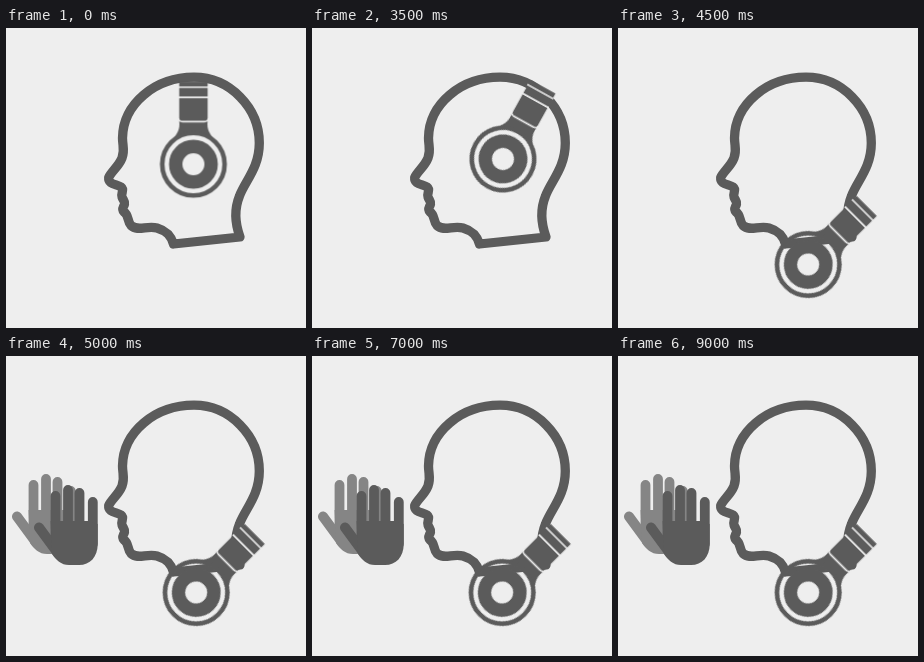
Write an HTML page without scripts that moves like this. It is 300x300 px and loops after 9500 ms.

```html
<!DOCTYPE html>
<html lang="en">
<head>
<meta charset="utf-8">
<title>Headphones off, hands clap</title>
<style>
  :root { --bg: #eee; --ink: #5b5b5b; --soft: #858585; }
  html, body { margin: 0; width: 100%; height: 100%; overflow: hidden; background: var(--bg); }
  svg { display: block; width: 100vw; height: 100vh; }

  .line { fill: none; stroke: var(--ink); stroke-linejoin: round; stroke-linecap: round; }
  .gap { fill: none; stroke: var(--bg); stroke-width: 1.7; }
  .wave { stroke-width: 1.7; }
  .ink { fill: var(--ink); }

  .phones, .wave, .hands, .hand { animation: 9.5s step-end infinite; }
  .phones { animation-name: slide; }
  .w1 { animation-name: w1; }
  .w2 { animation-name: w2; }
  .w3 { animation-name: w3; }
  .hands { animation-name: show; }
  .hand { animation-name: clap; }
  .back { --part: -9px; fill: var(--soft); stroke: var(--soft); }
  .front { --part: 7px; fill: var(--ink); stroke: var(--ink); }

  /* one step is 500 ms = 5.263% */
  @keyframes slide {
    0% { transform: translate(187.4px, 136.2px); }
    36.842% { transform: translate(191px, 131px) rotate(29deg); }
    42.105% { transform: translate(190px, 163.5px) rotate(62.5deg); }
    47.368%, 100% { transform: translate(190.2px, 236.5px) rotate(45deg); }
  }
  @keyframes w1 {
    0%, 36.842%, 100% { opacity: 0; }
    5.263% { opacity: 1; }
  }
  @keyframes w2 {
    0%, 21.052%, 36.842%, 100% { opacity: 0; }
    10.526%, 26.315% { opacity: 1; }
  }
  @keyframes w3 {
    0%, 21.052%, 36.842%, 100% { opacity: 0; }
    15.789%, 31.578% { opacity: 1; }
  }
  @keyframes show {
    0% { opacity: 0; }
    52.631%, 100% { opacity: 1; }
  }
  @keyframes clap {
    0%, 63.157%, 73.684%, 84.21%, 94.736%, 100% { transform: none; }
    57.894%, 68.421%, 78.947%, 89.473% { transform: translateY(var(--part)); }
  }
</style>
</head>
<body>
<svg viewBox="0 0 300 300">
  <defs>
    <g id="hand" stroke-linecap="round">
      <path fill="none" stroke-width="9.8" d="M49.5 140V180M62 134V180M73.5 137V180M86.8 146V188"/>
      <path fill="none" stroke-width="10" d="M33 171.5L51 196"/>
      <path stroke="none" d="M44.6 165H82L91.7 168V188C91.7 201 84 209 73 209H63C55 209 50 204 46 198Z"/>
    </g>
  </defs>

  <path class="line" stroke-width="9.3" d="M188 49.200
    C149 49.200 117 76 116.500 110
    C116.500 118 119 122 116 130
    C113 138 105 144 102.700 149.500
    C102 157 111 156 115 159
    C119 162 114.500 165 116 169
    C117 172 119 173 118.500 176
    C118 179 115 181 118 184
    C123 187 121 193 125 197.500
    C132 204 141 197 151 200
    C161 203 165 208 167.500 216
    L234 209
    C230 198 227 184 233.500 168
    C239 153 253.300 140 253.300 115
    C253.300 80 224 49.200 188 49.200Z"/>

  <path class="line wave w1" d="M148.300 126Q142.500 132.500 148.300 139M224.700 126Q230.500 132.500 224.700 139"/>
  <path class="line wave w2" d="M144 123Q136 132.500 144 142M229 123Q237 132.500 229 142"/>
  <path class="line wave w3" d="M140 119Q131.500 132.500 140 146M233 119Q241.500 132.500 233 146"/>

  <g class="phones">
    <path class="ink" d="M-14.200 -82.800H14.200V-46Q14.200 -42 14 -40C14 -32 18 -29 25 -18.500A31 31 0 0 0 -25 -18.500C-18 -29 -14 -32 -14 -40Q-14.200 -42 -14.200 -46Z"/>
    <path class="gap" d="M-15 -77H15M-15 -66.800H15M-15 -46Q-14.500 -42.600 -11 -42.600H11Q14.500 -42.600 15 -46"/>
    <circle class="line" r="31.200" stroke-width="4.600"/>
    <circle class="line" r="17.700" stroke-width="13.400"/>
  </g>

  <g class="hands">
    <g class="hand back"><use href="#hand" x="-22" y="-11"/></g>
    <g class="hand front"><use href="#hand"/></g>
  </g>
</svg>
</body>
</html>
```
